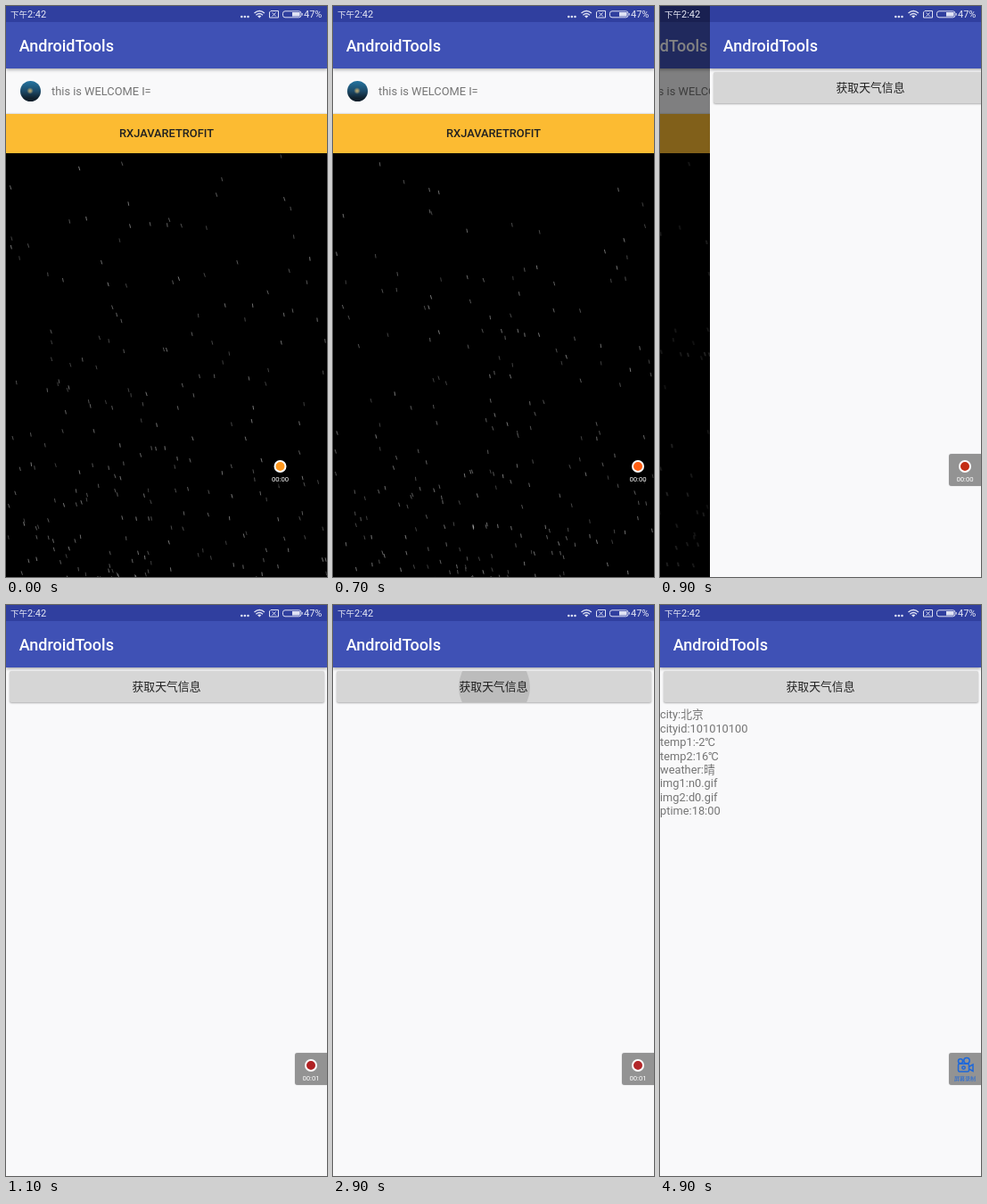
An HTML page with a canvas that plays this animation: 360 by 640 pixels, repeating every 5.7 s.

```html
<!DOCTYPE html>
<html lang="zh">
<head>
<meta charset="utf-8">
<style>
html, body { margin: 0; width: 100%; height: 100%; overflow: hidden; background: #000; }
#stage { position: relative; width: 360px; height: 640px; overflow: hidden;
  font: 12.83px Roboto, "Noto Sans CJK SC", "Noto Sans CJK", sans-serif; color: #757575; }
#stage div, canvas, svg { position: absolute; white-space: nowrap; }
.page { left: 0; top: 0; width: 360px; height: 640px; background: #f9f9fa; overflow: hidden; }
.bar { width: 360px; height: 70px; box-sizing: border-box; border-top: 18px solid #303f9f;
  background: #3f51b5; box-shadow: 0 1px 4px rgba(0,0,0,.4); }
.bar div { left: 14.7px; font: 500 18px/53px Roboto, sans-serif; color: #fff; }
.btn { text-align: center; font-weight: 500; color: #212121; }
#avatar { left: 15.5px; top: 83.5px; width: 23px; height: 23px; border-radius: 50%;
  background: radial-gradient(circle at 48% 48%, #a99f72 0 6%, transparent 22%),
    linear-gradient(#2474a0, #1d4a68 50%, #10202c 85%); }
#hello { left: 51px; top: 69px; line-height: 53px; }
#rx { top: 121px; width: 360px; height: 44px; line-height: 44px; background: #fcbb32;
  box-shadow: 0 0 2px rgba(0,0,0,.3); }
#rain { left: 0; top: 165px; background: #000; }
#dim { width: 360px; height: 640px; background: #000; }
#get { left: 3.5px; top: 74px; width: 353px; height: 35px; line-height: 35px; border-radius: 2px;
  background: #d6d6d6; box-shadow: 0 1px 2px rgba(0,0,0,.3); overflow: hidden; }
#ripple { left: -23px; top: -182px; width: 400px; height: 400px; border-radius: 50%; background: #000; }
#info { left: 0; top: 115.4px; line-height: 15.37px; }
#stage #info { white-space: pre; }
#time { left: 5px; top: 0; font-size: 11px; line-height: 19px; color: #e6e8f5; }
#time small { font-size: 9.5px; }
#power { left: 334px; top: 0; font-size: 11px; line-height: 19px; color: #e6e8f5; }
#float { left: 324px; top: 502px; width: 36px; height: 36px; border-radius: 3px 0 0 3px;
  background: rgba(0,0,0,.41); box-shadow: 0 0 1px rgba(0,0,0,.4); }
#dot { left: 11px; top: 6.5px; width: 10px; height: 10px; border: 2px solid #fff; border-radius: 50%; }
#clock, #label { width: 36px; top: 24px; text-align: center; font-size: 7.7px; line-height: 9px; color: #fff; }
#label { font-size: 6px; color: #1c68dc; }
</style>
</head>
<body>
<div id="stage">
  <div class="page" id="home">
    <div id="rx" class="btn">RXJAVARETROFIT</div>
    <div class="bar"><div>AndroidTools</div></div>
    <div id="avatar"></div>
    <div id="hello">this is WELCOME I=</div>
    <canvas id="rain" width="360" height="475"></canvas>
    <div id="dim"></div>
  </div>
  <div class="page" id="weather">
    <div class="bar"><div>AndroidTools</div></div>
    <div id="get" class="btn"><div id="ripple"></div>获取天气信息</div>
    <div id="info">city:北京
cityid:101010100
temp1:-2℃
temp2:16℃
weather:晴
img1:n0.gif
img2:d0.gif
ptime:18:00</div>
  </div>
  <div id="time"><small>下午</small>2:42</div>
  <svg width="360" height="19" fill="none" stroke="#dfe2f4">
    <path d="M264.3 12h0m3.6 0h0m3.6 0h0" stroke-width="2.6" stroke-linecap="round"/>
    <path d="M278.5 8q5.7-5 11.4 0M280.4 10.2q3.8-3.2 7.6 0" stroke-width="1.4"/>
    <path d="M282 11.3q2.2-1.5 4.4 0L284.2 13.6z" fill="#dfe2f4" stroke="none"/>
    <path d="M297 5.5h8.5v7.5h-10v-6zM298.6 7.4l4 4m0-4l-4 4"/>
    <rect x="310.5" y="5.8" width="20.5" height="7" rx="2.5"/>
    <path d="M321 7h8.6v4.6h-8.6z" fill="#dfe2f4" stroke="none"/>
    <path d="M332.2 8v2.6"/>
  </svg>
  <div id="power">47%</div>
  <div id="float">
    <div id="rec"><div id="dot"></div><div id="clock"></div></div>
    <div id="cam">
      <svg width="36" height="24" fill="none" stroke="#1c68dc" stroke-width="1.5">
        <circle cx="13" cy="9.2" r="2.5"/><circle cx="20" cy="8.8" r="3.2"/>
        <rect x="10.5" y="12.3" width="12" height="8.7" rx="1.5"/>
        <path d="M22.5 15.5l4.5-2.5v7.5l-4.5-2.5"/>
        <circle cx="16.5" cy="16.6" r="1.7"/>
      </svg>
      <div id="label">屏幕录制</div>
    </div>
  </div>
</div>
<script>
const $ = id => document.getElementById(id);
const LOOP = 5700, STEP = 100, W = 360, H = 475;
const ctx = $('rain').getContext('2d');

let seed = 42;
const rnd = () => (seed = seed * 16807 % 2147483647) / 2147483647;
const drops = Array.from({ length: 225 }, () => {
  const top = H * rnd() ** 2;
  return { x: rnd() * W, top, phase: rnd(), speed: .25 + rnd() * .2, lean: .5 + rnd(), light: .3 + rnd() * .3 };
});

// Linear interpolation through [time, value, ...] keys
function along(t, keys) {
  let a = keys[0];
  for (const b of keys) {
    if (t < b[0]) {
      const u = (t - a[0]) / (b[0] - a[0]);
      return a.slice(1).map((v, i) => v + (b[i + 1] - v) * u);
    }
    a = b;
  }
  return a.slice(1);
}

const slideKeys = [[0, 0], [700, 0], [800, .475], [900, .845], [1000, .97], [1100, 1]];
const dotKeys = [[0, 255, 152, 30], [700, 255, 94, 18], [800, 222, 64, 18],
  [900, 196, 46, 20], [1100, 176, 34, 36], [3500, 180, 40, 44]];

function drawRain(t) {
  ctx.clearRect(0, 0, W, H);
  ctx.lineWidth = .8;
  for (const d of drops) {
    const span = H - d.top;
    const fall = (d.phase * span + t * d.speed) % span;
    const x = (d.x + t * d.speed * .2) % W, y = d.top + fall;
    ctx.strokeStyle = `rgba(255,255,255,${d.light})`;
    ctx.beginPath();
    ctx.moveTo(x, y);
    ctx.lineTo(x + d.lean, y + 4.4);
    ctx.stroke();
  }
}

function draw(t) {
  const [p] = along(t, slideKeys);
  $('home').style.transform = `translateX(${-80 * p}px)`;
  $('dim').style.opacity = .58 * p;
  $('weather').style.transform = `translateX(${Math.round(W * (1 - p))}px)`;
  if (p < 1) drawRain(t);

  const press = (t - 2900) / 600, on = press >= 0 && press < 1;
  $('ripple').style.transform = `scale(${Math.min(1, .2 + press * 1.6)})`;
  $('ripple').style.opacity = on ? .12 * (1 - press) : 0;
  $('info').style.visibility = t >= 3200 ? 'visible' : 'hidden';

  const back = Math.max(0, 1 - t / 400) ** 2;
  $('float').style.transform = `translateX(${-34.5 * back}px)`;
  $('dot').style.background = `rgb(${along(t, dotKeys).map(Math.round)})`;
  $('clock').textContent = t < 1100 ? '00:00' : '00:01';
  $('rec').style.display = t < 3900 ? 'block' : 'none';
  $('cam').style.display = t < 3900 ? 'none' : 'block';
}

const start = performance.now();
function tick() {
  const t = (performance.now() - start) % LOOP;
  draw(Math.floor(t / STEP) * STEP);
  requestAnimationFrame(tick);
}
tick();
</script>
</body>
</html>
```
